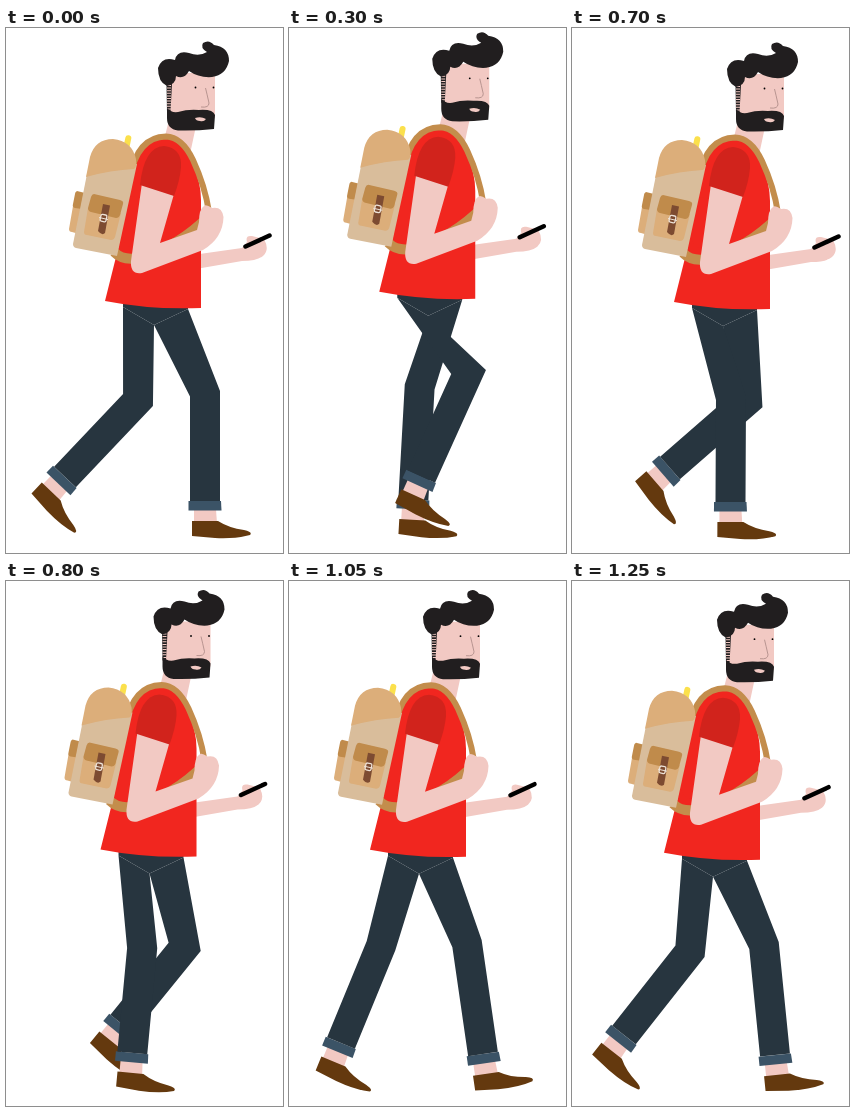
Animation, 277 px wide and 525 px high, one loop 1.3 s. Source, as an HTML page:

```html
<!DOCTYPE html>
<html>
<head>
<meta charset="utf-8">
<title>Walking man</title>
<style>
html, body { margin: 0; width: 100%; height: 100%; overflow: hidden; background: #fff; }
svg { display: block; width: 100%; height: 100%; }
.skin { fill: #f2c9c3; }
.hair { fill: #211e1f; }
.denim { fill: #27353f; }
.cuff { fill: #3b5366; }
.shoe { fill: #64390e; }
.strap { fill: none; stroke: #c38d4c; }
.tan { fill: #dcae7a; }
.brown { fill: #c08b4b; }
</style>
</head>
<body>
<svg viewBox="0 0 277 525">
  <defs>
    <g id="foot">
      <path class="skin" d="M-11 8H11L12 23H-11Z"/>
      <path class="shoe" d="M-13 20H13Q24 27 39 29Q48 31 45 34Q31 38 10 37L-13 35Z"/>
      <path class="cuff" d="M-16.5 0H16L16.5 9.5H-16.5Z"/>
    </g>
  </defs>

  <g class="leg"><use href="#foot"/><path class="denim"/></g>
  <g class="leg"><use href="#foot"/><path class="denim"/></g>

  <g id="body">
    <path class="denim" d="M117 268H182V281L148 297L117 279Z"/>

    <!-- far arm and phone -->
    <path class="skin" d="M190 226.5L236 220L241 214Q239 207 246 208L258 211Q264 222 257 228Q251 233 236 233L190 241Z"/>
    <path d="M239.5 218.5L263.5 207.5" stroke="#000" stroke-width="4.5" stroke-linecap="round"/>

    <!-- head -->
    <path class="skin" d="M163 45H209V90L190 98L184 126L158 112L164 88Z"/>
    <path class="hair" d="M160.500 55H166L164.500 84H161Z"/>
    <path d="M163 57V82" stroke="#f2c9c3" stroke-width="4" stroke-dasharray="1 1.6"/>
    <path class="hair" d="M161 80Q165 85 172 84Q182 81 193 82Q207 81 209 87L208 101Q190 103 172 102.500Q161 101 161 90Z"/>
    <path class="skin" d="M189 90Q195 88 200 91Q198 94 194 93Q190 93 189 90Z"/>
    <path class="hair" d="M161 58Q152 54 152 40Q156 28 169 32Q171 22 183 25Q193 29 201 24Q194 20 197 15Q203 11 208 17Q223 19 223 33Q220 47 206 49Q193 50 183 43Q178 52 170 48Q170 56 161 58Z"/>
    <circle cx="189.500" cy="59.500" r=".9"/>
    <circle cx="207.500" cy="59.500" r=".9"/>
    <path d="M199.500 60Q201 66 203 75Q203 80 195 79" fill="none" stroke="#a98783" stroke-width=".8"/>

    <!-- shirt and straps -->
    <path fill="#f1261f" d="M99 273L112 221L126 145Q134 108 160 108Q178 110 187 136Q195 155 195 172V280Q145 282 99 273Z"/>
    <path class="strap" stroke-width="6" d="M124 150Q131 109 160 108.500Q176 109 187 132Q199 158 203 184"/>
    <path class="strap" stroke-width="10" d="M108 224Q118 234 136 229Q172 219 203 188"/>
    <path fill="#f1261f" d="M116 209Q119 221 130 219L140 170L125 168Z"/>

    <!-- rucksack -->
    <rect x="118.500" y="107" width="6" height="14" rx="3" fill="#fbe04c" transform="rotate(12 121 114)"/>
    <path class="tan" d="M67 178L63 201Q63 204 66 204L73 206L79 180Z"/>
    <path class="brown" d="M71 163L79 165L76 181L69 180Q66 179 67 176L69 166Q69 164 71 163Z"/>
    <path fill="#d9bd9b" d="M81 146L67 216Q67 219 70 220L111 228L131 136Z"/>
    <path class="tan" d="M80 149L84 129Q89 111 107 111Q126 113 130 131Q131 139 128 141Q105 142 80 149Z"/>
    <path class="tan" d="M82 180L78 204Q78 207 81 207L105 212Q108 212 109 209L115 185Z"/>
    <path class="brown" d="M88 166L114 172Q118 173 117 176L114 187Q113 190 110 190L85 184Q82 183 82 180L85 169Q86 166 88 166Z"/>
    <path fill="#7d4b31" d="M97 176L104 177.500L99 205Q96 208 92 203Z"/>
    <rect x="94.500" y="186.500" width="6" height="7" rx="1.500" fill="none" stroke="#eee3d8" stroke-width="1.300" transform="rotate(12 97 190)"/>
    <path d="M93 189.500L102 191.500" stroke="#eee3d8"/>

    <!-- near arm -->
    <path class="skin" d="M136 155L125 233Q124 247 136 245L197 222Q217 210 217.500 189Q216 178 206 180Q200 176 198 178Q193 181 193 194L191 202L154 215L168 166Z"/>
    <path fill="#d1231c" d="M134 157Q138 119 158 118Q176 120 175 139Q174 152 168 168Z"/>
  </g>
</svg>
<script>
const LOOP = 1300, STEP = 50, THIGH = 91;

// time, body offset x y, then knee x, ankle x y for the front and the back hip
const poses = [
  [0,     0,   0,    199, 199, 473,  132, 59, 449],
  [150,   0, -10,    167, 167, 474,  166, 91, 437],
  [325, -10,  -9,    129, 117, 471,  180, 139, 451],
  [500, -15,  -5.2,  128, 65, 453,   148, 181, 472],
  [600,  -5,  -2,    138, 66, 447,   163, 186, 474],
  [700,   3,   1,    175, 98, 440,   159, 158.5, 474],
  [900, -14, -10,    180, 135, 450,  109, 94, 468],
  [1050, -18, -4.3,  178, 194, 473,  92, 52, 462],
  [1150, -14, -2,    186, 211, 472,  96, 38, 458],
  [1250, -7,  -1.3,  192, 203, 474,  118, 52, 454]
];
const hips = [
  { x: 166, left: [148, 297], right: [182, 281] },
  { x: 133, left: [117, 279], right: [148, 297] }
];
const HIP_Y = 281;
const legs = document.querySelectorAll(".leg");
const body = document.getElementById("body");

// Pose i of the endless cycle
function poseAt(i) {
  const n = poses.length, turn = Math.floor(i / n);
  const [t, ...values] = poses[i - turn * n];
  return [t + turn * LOOP, ...values];
}

// Smooth interpolation without overshoot
function sample(t) {
  const i = poses.findLastIndex(p => p[0] <= t);
  const [p, a, b, q] = [-1, 0, 1, 2].map(k => poseAt(i + k));
  const span = b[0] - a[0], u = (t - a[0]) / span;
  const slope = (m, n, k) => (n[k] - m[k]) / (n[0] - m[0]);
  const tangent = (d, e) => d * e > 0 ? 2 * d * e / (d + e) : 0;
  return a.slice(1).map((v, j) => {
    const k = j + 1, mid = slope(a, b, k);
    const m0 = tangent(slope(p, a, k), mid) * span;
    const m1 = tangent(mid, slope(b, q, k)) * span;
    const d = b[k] - v;
    return v + u * (m0 + u * (3 * d - 2 * m0 - m1 + u * (m0 + m1 - 2 * d)));
  });
}

function drawLeg(leg, hip, dx, dy, kneeX, ankleX, ankleY) {
  const hipX = hip.x + dx, hipY = HIP_Y + dy;
  const kneeY = hipY + Math.sqrt(THIGH ** 2 - (kneeX - hipX) ** 2);
  const upper = Math.atan2(hipX - kneeX, kneeY - hipY);
  const lower = Math.atan2(kneeX - ankleX, ankleY - kneeY);
  const across = (x, y, angle, w) => [x + w * Math.cos(angle), y + w * Math.sin(angle)];
  const bend = (upper + lower) / 2, kneeW = 15 / Math.cos((upper - lower) / 2);
  const shift = ([x, y]) => [x + dx, y + dy];
  const outline = [
    shift(hip.left),
    across(kneeX, kneeY, bend, -kneeW),
    across(ankleX, ankleY, lower, -15),
    across(ankleX, ankleY, lower, 15),
    across(kneeX, kneeY, bend, kneeW),
    shift(hip.right)
  ];
  const [foot, trousers] = leg.children;
  trousers.setAttribute("d", "M" + outline.join("L") + "Z");
  foot.setAttribute("transform",
    `translate(${ankleX} ${ankleY}) rotate(${lower * 180 / Math.PI})`);
}

function draw() {
  const t = Math.floor(performance.now() % LOOP / STEP) * STEP;
  const [dx, dy, ...joints] = sample(t);
  body.setAttribute("transform", `translate(${dx} ${dy})`);
  legs.forEach((leg, i) => drawLeg(leg, hips[i], dx, dy, ...joints.slice(i * 3, i * 3 + 3)));
  requestAnimationFrame(draw);
}
draw();
</script>
</body>
</html>
```
